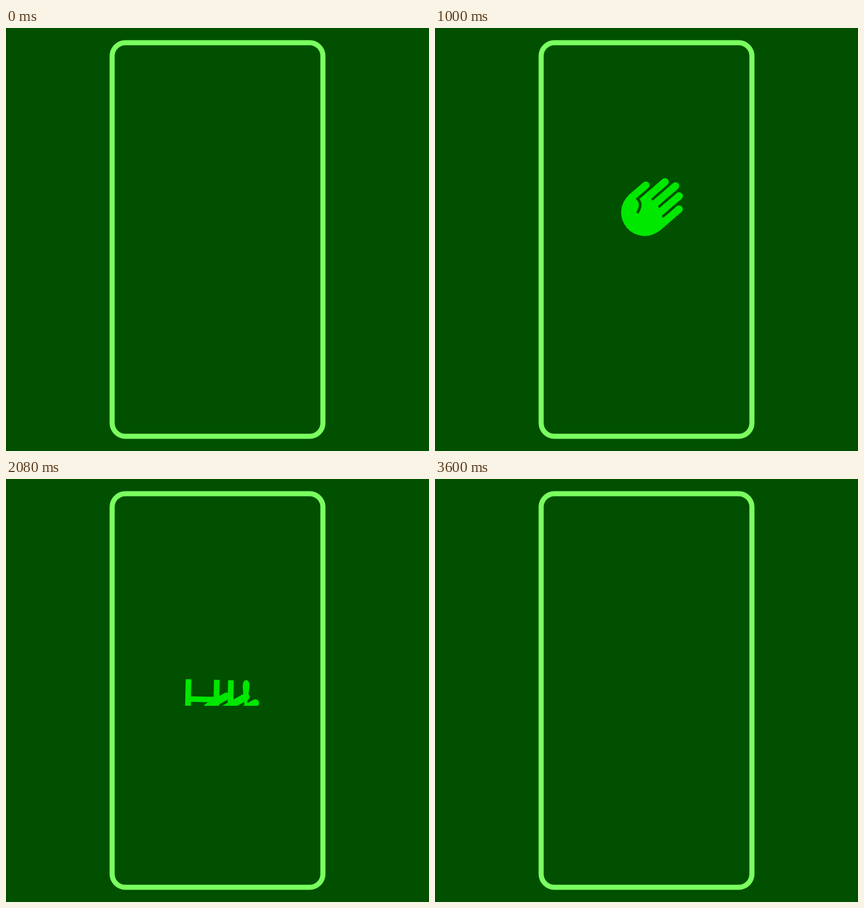
Animation, 748 px wide and 748 px high, one loop 4000 ms. Source, as an HTML page with a canvas:

```html
<!DOCTYPE html>
<html lang="en">
<head>
<meta charset="utf-8">
<title>Hi</title>
<style>
  html, body { margin: 0; width: 100%; height: 100%; overflow: hidden; background: #005000; }
  canvas { display: block; width: 748px; height: 748px; }
</style>
</head>
<body>
<canvas id="stage" width="748" height="748"></canvas>
<script>
const ctx = document.getElementById('stage').getContext('2d');
const LOOP = 4000, STEP = 40, HORIZON = 401;
const BG = '#005000', FRAME = '#7aff60', INK = '#00e800';
const RAD = Math.PI / 180;

const clamp = u => Math.min(1, Math.max(0, u));
const progress = (t, start, length) => clamp((t - start) / length);

// How far a figure is sunk: 1 is hidden below the horizon, 0 is fully up.
const rising = (t, start, length) => (1 - progress(t, start, length)) ** 4;
const sinking = (t, start, length) => progress(t, start, length) ** 4;

function line(points, width, color, cap = 'butt') {
  ctx.beginPath();
  points.forEach(([x, y]) => ctx.lineTo(x, y));
  ctx.lineWidth = width;
  ctx.strokeStyle = color;
  ctx.lineCap = cap;
  ctx.stroke();
}

function disc(x, y, r) {
  ctx.beginPath();
  ctx.arc(x, y, r, 0, 2 * Math.PI);
  ctx.fill();
}

function placed(x, y, degrees, draw) {
  ctx.save();
  ctx.translate(x, y);
  ctx.rotate(degrees * RAD);
  ctx.fillStyle = INK;
  draw();
  ctx.restore();
}

function drawFrame() {
  ctx.beginPath();
  ctx.roundRect(187.7, 26, 372.7, 696, 23.5);
  ctx.lineWidth = 9;
  ctx.strokeStyle = FRAME;
  ctx.stroke();
}

// Palm centred on the origin, fingers pointing along +x.
function hand() {
  const tips = [33, 62.5, 72, 65.4, 50];
  const roots = [24.5, 25, 18.6];
  const row = i => (i - 2) * 17.6;
  disc(0, 0, 41.6);
  tips.forEach((x, i) => line([[0, row(i)], [x, row(i)]], 13.2, INK, 'round'));
  roots.forEach((x, i) => line([[x, row(i + 1.5)], [46, row(i + 1.5)]], 4.4, BG));

  // Gap beside the thumb, running into the crease of the palm.
  ctx.beginPath();
  ctx.moveTo(42, row(0.5));
  ctx.lineTo(6.3, row(0.5));
  ctx.quadraticCurveTo(7.1, -13, -10.5, -7.7);
  ctx.lineWidth = 4.7;
  ctx.lineCap = 'butt';
  ctx.strokeStyle = BG;
  ctx.stroke();
}

function greeting() {
  ctx.fillRect(-57, -35, 10, 70);
  ctx.fillRect(-7, -35, 10, 70);
  ctx.fillRect(-48, -4.8, 42, 9.6);
  ctx.fillRect(18, -35, 10, 70);
  ctx.beginPath();
  ctx.moveTo(48.4, 14);
  ctx.lineTo(44.2, -22);
  ctx.bezierCurveTo(42.4, -40.5, 57.6, -40.5, 55.8, -22);
  ctx.lineTo(51.6, 14);
  ctx.closePath();
  ctx.fill();
  disc(50, 29.3, 6.5);
}

function drawHand(t) {
  const sunk = t < 1400 ? rising(t, 530, 800) : sinking(t, 1465, 660);
  if (sunk === 1) return;
  const wave = 3.75 + 8.25 * Math.cos(2 * Math.PI * (t - 2080) / 820);
  placed(370.5 + 0.62 * wave, 322 + 144.5 * sunk, wave - 41, hand);
}

function drawGreeting(t) {
  const sunk = t < 2650 ? rising(t, 1960, 770) : sinking(t, 2675, 770);
  if (sunk === 1) return;
  placed(374, 315.6 + 147 * sunk, -7.2 + 16.8 * sunk, greeting);
}

function render(t) {
  ctx.fillStyle = BG;
  ctx.fillRect(0, 0, 748, 748);
  drawFrame();
  ctx.save();
  ctx.beginPath();
  ctx.rect(0, 0, 748, HORIZON);
  ctx.clip();
  drawHand(t);
  drawGreeting(t);
  ctx.restore();
}

function tick() {
  const t = performance.now() % LOOP;
  render(Math.floor(t / STEP) * STEP);
  requestAnimationFrame(tick);
}
tick();
</script>
</body>
</html>
```
